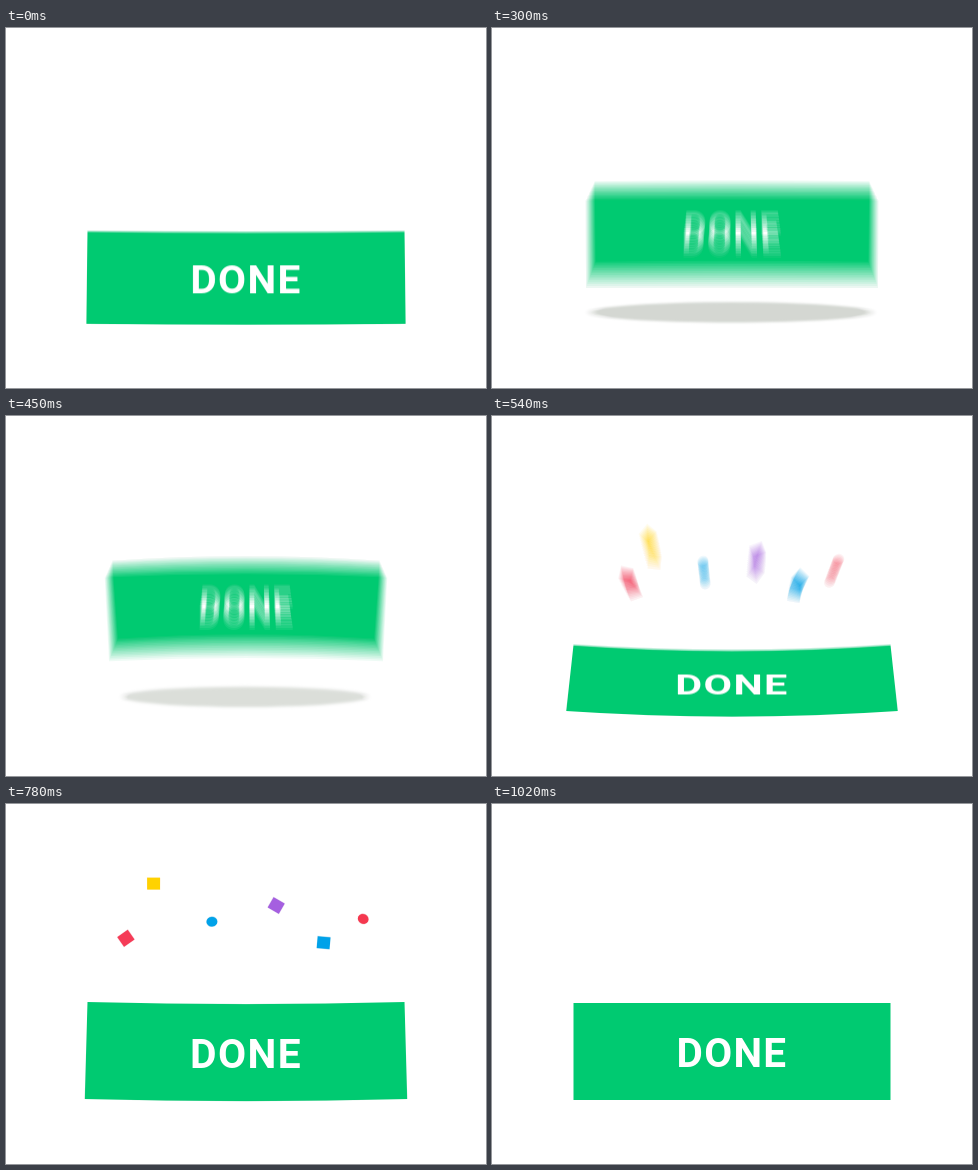
These frames come from a looping animation (480x360 px, 1200 ms). An HTML page with a canvas:

```html
<!DOCTYPE html>
<html lang="en">
<head>
<meta charset="utf-8">
<title>Done button</title>
<style>
  html, body { margin: 0; width: 100%; height: 100%; overflow: hidden; background: #fff; }
  canvas { display: block; }
</style>
</head>
<body>
<canvas id="stage" width="480" height="360"></canvas>
<script>
const W = 480, H = 360, CX = 240, FLOOR = 296;
const HALF = 158.5, TALL = 97;
const LOOP = 1200, STEP = 30, SHUTTER = 20, SAMPLES = 16;

// colour, round, x, y, angle
const CONFETTI = [
  ["#ffd200", false, 146, 75.7, -4],
  ["#f53b57", false, 121.5, 130.4, -31],
  ["#a55fe0", false, 268.6, 97.6, 26],
  ["#00a2e9", true, 207.5, 113.8, 0],
  ["#00a2e9", false, 316, 134.8, 1],
  ["#f5384f", true, 358.8, 111, 30]
];

const ctx = document.getElementById("stage").getContext("2d");
const layer = document.createElement("canvas");
layer.width = W;
layer.height = H;
const g = layer.getContext("2d");

const phase = (t, from, to) => Math.min(1, Math.max(0, (t - from) / (to - from)));
const smooth = u => u * u * (3 - 2 * u);
const arc = u => 4 * u * (1 - u);

// Eases from 0 up to 1 at the peak and back to 0.
const bump = (t, from, peak, to) => smooth(phase(t, from, peak)) - smooth(phase(t, peak, to));

// Shape of the button: a crouch, a high jump, a landing, a small hop and a settle.
function pose(t) {
  const u1 = phase(t, 270, 490) % 1, u2 = phase(t, 600, 720) % 1;
  const jump = arc(u1), hop = arc(u2), air = u1 + u2;
  const squash = bump(t, -60, 190, 270) + bump(t, 480, 540, 600);
  const settle = bump(t, 720, 765, 870);
  const flat = 28 * jump;
  const bottom = FLOOR - 92 * jump - 24.5 * hop - flat / 2 - squash - settle;
  return {
    air,
    bottom,
    top: bottom - TALL + 32 * squash + flat,
    half: HALF - 36 * jump - 13 * hop,
    bow: 5.7 * squash + 2.2 * settle - 8 * air * (jump + hop)
  };
}

function drawShadow({ air, half }) {
  if (!air) return;
  g.save();
  g.filter = `blur(${1 + air}px)`;
  g.globalAlpha = 1 - 0.25 * air;
  g.fillStyle = "#d3d7d1";
  g.beginPath();
  g.ellipse(CX - 1, 285 - 5 * air, half - 20 * air, 10, 0, 0, 7);
  g.fill();
  g.restore();
}

// Pieces burst out of the landing, drift down and shrink away.
function drawConfetti(t) {
  if (t < 495) return;
  const out = 1 - (1 - phase(t, 495, 645)) ** 3;
  const size = 1 - 0.05 * phase(t, 660, 780) - 0.95 * phase(t, 780, 960) ** 2;
  const late = Math.max(0, t - 660) / 120;
  const fall = 0.00012 * Math.max(0, t - 600) ** 2;
  CONFETTI.forEach(([color, round, x, y, angle], i) => {
    const side = i % 2 ? -1 : 1;
    g.save();
    g.translate(x + (CX - x) * 0.4 * (1 - out) + 1.6 * side * late, y + (235 - y) * (1 - out) + fall);
    g.rotate((angle + 4 * side * late - 180 * (1 - out)) * Math.PI / 180);
    g.scale(size, size);
    g.fillStyle = color;
    g.beginPath();
    if (round) g.ellipse(0, 0, 5.8, 5.2, 0, 0, 7);
    else g.rect(-6.8, -6.3, 13.6, 12.6);
    g.fill();
    g.restore();
  });
}

function drawButton({ top, bottom, half, bow }) {
  const foot = half + 1.3 * bow;
  g.fillStyle = "#00ca71";
  g.beginPath();
  g.moveTo(CX - half, top);
  g.quadraticCurveTo(CX, top + 2 * bow, CX + half, top);
  g.lineTo(CX + foot, bottom);
  g.quadraticCurveTo(CX, bottom + 2 * bow, CX - foot, bottom);
  g.fill();

  g.save();
  g.translate(CX, (top + bottom) / 2 + bow + 1);
  g.scale((half + foot) / 2 / HALF, (bottom - top) / TALL);
  g.font = "600 40.5px Roboto, sans-serif";
  g.letterSpacing = "1.3px";
  g.textAlign = "center";
  g.fillStyle = "#fff";
  g.fillText("DONE", 0, 14.4);
  g.restore();
}

// Averages several moments around t to give motion blur.
function render(t) {
  for (let i = 0; i < SAMPLES; i++) {
    const s = t + SHUTTER * ((i + 0.5) / SAMPLES - 0.5);
    const button = pose(s);
    g.fillStyle = "#fff";
    g.fillRect(0, 0, W, H);
    drawShadow(button);
    drawConfetti(s);
    drawButton(button);
    ctx.globalAlpha = 1 / (i + 1);
    ctx.drawImage(layer, 0, 0);
  }
}

let shown = -1;
const start = performance.now();
function tick() {
  const t = Math.floor((performance.now() - start) % LOOP / STEP) * STEP;
  if (t !== shown) render(shown = t);
  requestAnimationFrame(tick);
}
tick();
</script>
</body>
</html>
```
